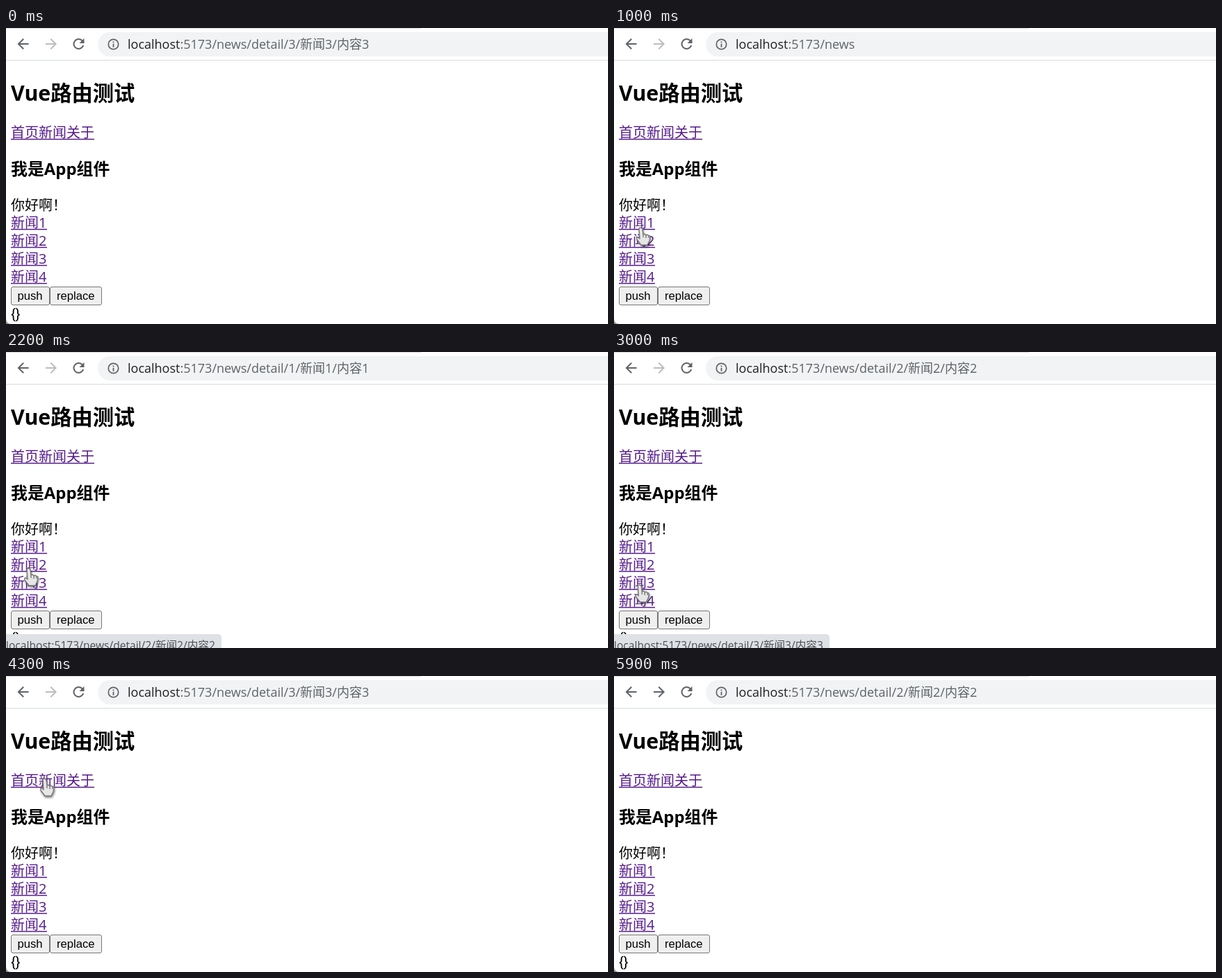
An HTML page for the animation above (6200 ms loop, 866 px wide and 427 px high).

```html
<!DOCTYPE html>
<html lang="zh-CN">
<head>
<meta charset="utf-8">
<title>Vue路由测试</title>
<style>
html, body { margin: 0; width: 100%; height: 100%; overflow: hidden; background: #fff; }
svg { display: block; }
text { font-family: "Open Sans", "Noto Sans CJK SC", "Noto Sans CJK", sans-serif; white-space: pre; }
.link { font-size: 20px; fill: #551a8b; }
.line { stroke: #551a8b; stroke-width: 1.4; }
.button { font: 16.67px "Liberation Sans", Arial, sans-serif; }
.box { fill: #efefef; stroke: #767676; }
.box.hover { fill: #e5e5e5; stroke: #4f4f4f; }
.icon { fill: #5f6368; }
.cursor { fill: #e6e6e6; stroke: #777; stroke-width: 1.4; stroke-linejoin: round; filter: drop-shadow(1px 2px 1.5px #0007); }
</style>
</head>
<body>
<svg width="866" height="427" viewBox="0 0 866 427">
  <path d="M0 .5H597" stroke="#dcdcdc"/>
  <path d="M0 46.5H866" stroke="#d9dbdf"/>
  <rect x="132" y="6" width="780" height="35" rx="17.5" fill="#f1f3f4"/>
  <circle id="halo" cx="24.5" cy="23.5" r="17.2" fill="#d3d4d6"/>
  <path id="arrow" class="icon" transform="translate(12.5 11)" d="M20 11H7.83l5.59-5.59L12 4l-8 8 8 8 1.41-1.41L7.83 13H20z"/>
  <use id="forward" href="#arrow" transform="translate(89.5 0) scale(-1 1)"/>
  <path class="icon" transform="translate(92.5 11)" d="M17.65 6.35A8 8 0 1 0 19.73 14h-2.08A6 6 0 1 1 16.22 7.78L13 11h7V4z"/>
  <circle cx="154.5" cy="23.5" r="7.2" fill="none" stroke="#5f6368" stroke-width="1.7"/>
  <path class="icon" d="M153.6 19.5h1.8v1.8h-1.8zm0 3.3h1.8v5h-1.8z"/>
  <text x="175" y="30" font-size="18" fill="#202124">localhost<tspan id="path" fill="#5f6368"></tspan></text>

  <text x="7" y="105" font-size="30.3" font-weight="700">Vue路由测试</text>
  <text class="link" x="7" y="158">首页新闻关于</text>
  <path class="line" d="M7 160.5H127"/>
  <text x="7" y="212" font-size="23.9" font-weight="700">我是App组件</text>
  <text x="7" y="262.5" font-size="20">你好啊！</text>
  <g id="links"></g>
  <rect id="push" class="box" x="7.5" y="373.5" width="55" height="26" rx="2.5"/>
  <rect class="box" x="63.5" y="373.5" width="74" height="26" rx="2.5"/>
  <text class="button" x="16.5" y="392">push</text>
  <text class="button" x="73" y="392">replace</text>
  <text id="query" x="7" y="420" style="font: 20px Roboto, sans-serif">{}</text>
  <path d="M0 419Q0 427 8 427H0z" fill="#8f8f8f"/>

  <g id="status">
    <path d="M0 407H305Q310 407 310 412V427H0z" fill="#dee1e6"/>
    <text id="target" x="0" y="428.5" font-size="15.6" fill="#4d5156"></text>
  </g>
  <path id="pointer" class="cursor" d="M0 0L2 17 6 15 10 22Q13 24 15 20L12 13 14 10z"/>
  <path id="hand" class="cursor" d="M-2 2Q-2 0 0 0T3 2L4 10Q6 8 8 11 10 9 12 12 14 11 14 14L13 19 10 25H1L-5 17Q-6 13-3 14L-1 16zM4 10v4M8 11v4M12 12v3"/>
</svg>
<script>
const $ = id => document.getElementById(id);
const LOOP = 6200, STEP = 100, ROW = 26;
const clamp = (v, lo = 0, hi = 1) => Math.min(hi, Math.max(lo, v));
const within = (v, lo, hi) => v >= lo && v <= hi;
const detail = n => `:5173/news/detail/${n}/新闻${n}/内容${n}`;

$('links').innerHTML = [1, 2, 3, 4].map(n => {
  const y = 262 + ROW * n;
  return `<text class="link" x="7" y="${y}">新闻${n}</text>
    <path class="line" d="M7 ${y + 2.5}H59"/>`;
}).join('');

// Cursor stops: time, x, y
const stops = [
  [100, 855, 46], [300, 219, 156], [600, 60, 150], [700, 25, 222], [1000, 38, 288],
  [1900, 38, 288], [2200, 32, 312], [2700, 32, 312], [3200, 44, 378], [4000, 44, 378],
  [4300, 55, 148], [4700, 18, 14], [5100, 18, 14], [5400, 758, 108]
];
// Visited pages: time, news item (0 is the list)
const visits = [[0, 3], [600, 0], [1700, 1], [2700, 2], [3900, 3], [5100, 2]];

function cursorAt(t) {
  const i = clamp(stops.findLastIndex(s => s[0] <= t), 0, stops.length - 2);
  const [t0, x0, y0] = stops[i], [t1, x1, y1] = stops[i + 1];
  const p = clamp((t - t0) / (t1 - t0)) ** 2;
  return [x0 + (x1 - x0) * p, y0 + (y1 - y0) * p];
}

function draw(t) {
  const n = visits.findLast(v => v[0] <= t)[1];
  const [x, y] = cursorAt(t);
  const row = clamp(Math.floor((y - 270) / ROW) + 1, 1, 4);
  const onLink = within(x, 7, 127) && within(y, 141, 162) || within(x, 7, 59) && within(y, 270, 372);

  $('path').textContent = n ? detail(n) : ':5173/news';
  $('query').style.opacity = n ? 1 : 0;
  $('target').textContent = 'localhost' + detail(row);
  $('status').style.opacity = Math.min(clamp((t - 1100) / 200), clamp((3700 - t) / 350));
  $('push').classList.toggle('hover', within(x, 7, 63) && within(y, 373, 400));
  $('halo').style.opacity = clamp((t - 4500) / 200) * (t < 5700);
  $('forward').style.opacity = t < 5100 ? .42 : 1;

  $('pointer').style.display = $('hand').style.display = 'none';
  if (within(t, 100, 5400)) {
    const shape = $(onLink ? 'hand' : 'pointer');
    shape.style.display = '';
    shape.setAttribute('transform', `translate(${x} ${y})`);
  }
}

const start = performance.now();
function tick() {
  const t = (performance.now() - start) % LOOP;
  draw(Math.floor(t / STEP) * STEP);
  requestAnimationFrame(tick);
}
tick();
</script>
</body>
</html>
```
